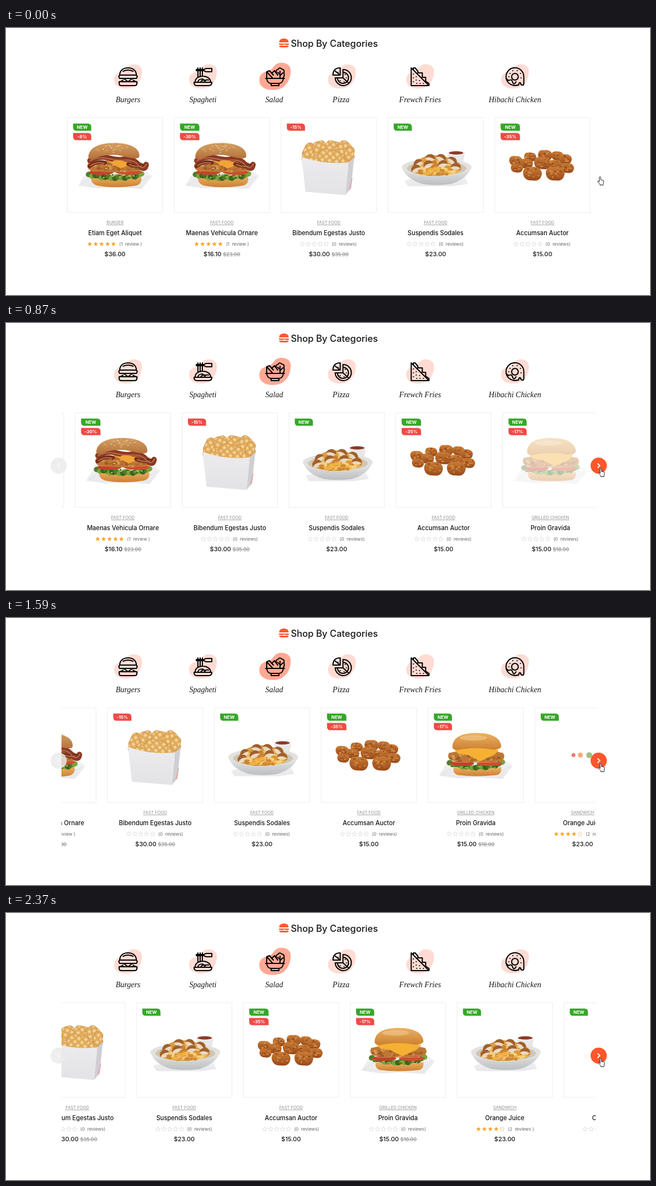
Write an HTML page that moves like this. It is 1161 px wide and 482 px high and loops after 2.4 s.

```html
<!DOCTYPE html>
<html lang="en">
<head>
<meta charset="utf-8">
<title>Shop By Categories</title>
<style>
html, body { margin: 0; width: 100%; height: 100%; overflow: hidden; background: #fff; }
svg { display: block; width: 100vw; height: 100vh; }
text { font-family: Inter, sans-serif; font-weight: 500; fill: #161616; white-space: pre; }
.mid { text-anchor: middle; }
.heading { font-size: 16.6px; }
.label { font: italic 14px "Liberation Serif", serif; }
.category { font-size: 7.6px; font-weight: 400; fill: #8c8c8c; text-decoration: underline; }
.title { font-size: 11.1px; }
.reviews { font-size: 8.1px; font-weight: 400; fill: #666; }
.price { font-size: 11px; }
.old { font-size: 9px; fill: #8c8c8c; text-decoration: line-through; }
.badge { font-size: 8px; font-weight: 700; fill: #fff; }
.icon { fill: none; stroke: #000; stroke-width: 2.1; stroke-linejoin: round; stroke-linecap: round; }
</style>
</head>
<body>
<svg id="stage" viewBox="0 0 1161 482"></svg>
<script>
const PITCH = 192.65, FIRST_LEFT = 110.5, CARD_WIDTH = 172, LOOP = 2400;

let seed = 7;
const rnd = () => (seed = (seed * 16807) % 2147483647) / 2147483647;
const range = n => [...Array(n).keys()];
const path = (d, fill, extra = '') => `<path d="${d}" fill="${fill}" ${extra}/>`;
const line = (d, color, width) =>
  path(d, 'none', `stroke="${color}" stroke-width="${width}" stroke-linecap="round"`);
const oval = (x, y, rx, ry, fill, extra = '') =>
  `<ellipse cx="${x}" cy="${y}" rx="${rx}" ry="${ry}" fill="${fill}" ${extra}/>`;
const group = (x, y, body, extra = '') => `<g transform="translate(${x} ${y})" ${extra}>${body}</g>`;
const turned = (x, y, angle, body) => `<g transform="translate(${x} ${y}) rotate(${angle})">${body}</g>`;
const text = (x, y, cls, body) => `<text x="${x}" y="${y}" class="${cls}">${body}</text>`;

// Small random flecks inside an ellipse.
const flecks = (n, x, y, rx, ry, colors, size) => range(n).map(i => {
  const a = rnd() * 6.283, r = Math.sqrt(rnd());
  return oval((x + Math.cos(a) * r * rx).toFixed(1), (y + Math.sin(a) * r * ry).toFixed(1),
    (size * (.6 + rnd() * .8)).toFixed(1), (size * (.4 + rnd() * .5)).toFixed(1), colors[i % colors.length]);
}).join('');

const gradient = (id, top, bottom) =>
  `<linearGradient id="${id}" x2="0" y2="1"><stop stop-color="${top}"/><stop offset="1" stop-color="${bottom}"/></linearGradient>`;

const defs = `<defs>
  ${gradient('bun', '#d6a063', '#b3713a')}${gradient('gold', '#eab264', '#cd7f31')}
  ${gradient('box', '#ececee', '#e3e3e6')}${gradient('paper', '#f4f4f5', '#e8e8eb')}
  ${gradient('plate', '#e9e9e8', '#bcbec0')}${gradient('nugget', '#ca7c35', '#97491a')}
  <pattern id="waffle" width="9" height="9" patternUnits="userSpaceOnUse" patternTransform="rotate(40)">
    <rect width="9" height="9" fill="#e6b264"/><rect x="2.5" y="2.5" width="4.6" height="4.6" rx="1" fill="#f3d5a0"/>
    <path d="M0 0H9M0 0V9" stroke="#d39a4c" stroke-width="1.4"/>
  </pattern>
  <clipPath id="window"><rect x="100" y="150" width="963" height="280"/></clipPath>
</defs>`;

// ---- Food pictures, drawn around (0, 0) ----
const napkin = path('M-66 37L-46 4H46L67 20L48 43L4 40L-30 42Z', 'url(#paper)')
  + line('M-60 36L-44 22M61 21L46 30', '#dcdce0', 1);
const lettuce = (y, rise) => range(17).map(i => {
  const sag = 1 - ((i - 8) / 8) ** 2;
  return oval(-47 + i * 5.9, (y + sag * rise + 1.5 * Math.sin(i * 1.9)).toFixed(1), 5.5, 5,
    ['#4d7f27', '#7ba23c', '#3d651f'][i % 3]);
}).join('') + flecks(24, 0, y + rise * .7, 46, 5, ['#9dbb54', '#32551a'], 2);
const patty = y => path(`M-48 ${y - 8}Q0 ${y - 18} 49 ${y - 8}Q55 ${y} 47 ${y + 6}Q0 ${y + 12} -44 ${y + 6}Q-53 ${y} -48 ${y - 8}Z`, '#bd7835')
  + flecks(55, 0, y, 46, 8, ['#9d5b27', '#d79c58', '#ad662a'], 2.6);
const tomatoes = y => oval(-25, y, 22, 4.5, '#c6402a') + oval(25, y, 23, 4.5, '#d04c30') + line(`M-40 ${y - 2}H-12M6 ${y - 2}H40`, '#e2805f', 1);

const foods = {
  bacon: napkin
    + path('M-43 20H47Q50 34 38 37Q0 43 -32 37Q-45 33 -43 20Z', 'url(#gold)')
    + lettuce(17, 6) + tomatoes(13) + patty(4)
    + path('M-16 -8L24 -9L30 -1L10 6Z', '#f2a437')
    + line('M-45 -8Q-30 -18 -12 -13T18 -11T42 -1T56 -1', '#8a3a24', 10)
    + line('M-46 2Q-32 -9 -18 -4M24 -2Q36 3 50 1', '#74301d', 7)
    + line('M-45 -8Q-30 -16 -14 -12T18 -9T42 0T57 -2M-44 1Q-32 -7 -20 -3M26 -1Q37 4 48 2', '#bb6c4b', 2)
    + line('M-2 -6Q6 -8 16 -5', '#f2a437', 4)
    + path('M-48 -14C-48 -28 -34 -40 -2 -40C29 -40 45 -30 44 -16C43 -9 28 -13 10 -17C-10 -21 -28 -16 -37 -12Q-46 -9 -48 -14Z', 'url(#bun)')
    + flecks(34, -3, -30, 34, 8, ['#e2bd88', '#c48a4c', '#dcae74'], 1.7),

  chicken: napkin
    + path('M-40 22H46Q47 34 38 36Q0 40 -32 36Q-42 33 -40 22Z', 'url(#gold)')
    + lettuce(14, 8) + tomatoes(15) + patty(4)
    + path('M-38 -9Q0 -19 42 -9L34 -1L8 11L-14 0L-32 -3Z', '#f6b034')
    + path('M-42 -14C-42 -31 -28 -40 2 -40C32 -40 46 -29 46 -15Q42 -9 30 -10Q0 -16 -32 -9Q-41 -9 -42 -14Z', 'url(#gold)')
    + oval(-4, -31, 24, 5, '#f6d195', 'opacity=".5"'),

  fries: [[-27, -14, 21, 13, -30], [28, -14, 17, 13, 25], [-37, -26, 8, 15, 25], [-16, -30, 12, 13, -15], [8, -31, 14, 12, 12],
      [27, -30, 12, 13, 40], [37, -21, 8, 13, 15], [2, -15, 20, 12, 12]].map(([x, y, rx, ry, turn]) =>
      turned(x, y, turn, `<rect x="${-rx}" y="${-ry}" width="${2 * rx}" height="${2 * ry}" rx="8" fill="url(#waffle)" stroke="#cf9448"/>`)).join('')
    + path('M36 -5L46 -15L40 42L30 54Z', '#cfcfd3') + path('M41 25L43 23L40 42L36 46Z', '#e2a9ad')
    + path('M-49 -15Q-8 0 36 -5L30 54L-42 48Z', 'url(#box)'),

  bowl: path('M-56 28L-20 18L50 16L58 34L30 38H-50Z', 'url(#paper)')
    + path('M21 -22L25 -3H49L53 -22Z', '#e8e8e9') + oval(37, -22, 16, 4.5, '#f1f1f1') + oval(37, -22, 13, 3, '#8a3a28')
    + path('M-61 3Q-54 25 -24 34Q2 38 28 34Q57 25 65 3Z', 'url(#plate)')
    + oval(2, 4, 63, 16, '#e3e2df') + oval(2, 6, 54, 13, '#cfc6b5')
    + path('M-45 6Q-34 -13 -10 -18Q20 -19 42 -4Q52 6 40 13Q0 25 -36 15Z', '#d99f48')
    + flecks(70, 2, 4, 43, 13, ['#efbd62', '#c98234', '#f3cd80', '#dd9733'], 4.2)
    + [[-32, -3], [-10, -13], [-14, -1], [10, -13], [13, -2], [30, -8], [36, 3], [-36, 7]].map(([x, y], i) =>
      turned(x, y, i * 47 % 80 - 40,
        path('M-9 2Q-8 -7 2 -7Q10 -5 9 2L5 4Z', '#a0602f') + path('M-9 2Q-3 -4 9 2Q4 7 -3 6Z', '#ead9bf'))).join('')
    + flecks(22, 2, 12, 38, 6, ['#f0b142', '#f4d07c', '#d08a35'], 4),

  nuggets: [[-22, -15, 11], [5, -18, 13], [27, -17, 11], [-48, -8, 12], [41, -11, 12], [-29, -3, 12], [0, -4, 15], [23, 0, 13],
      [45, 5, 12], [-46, 5, 11], [-18, 15, 17], [23, 15, 17]].map(([x, y, r]) =>
      path(`M${x - r} ${y}Q${x - r} ${y - r * .8} ${x - r * .2} ${y - r * .7}Q${x + r * .9} ${y - r * .8} ${x + r} ${y}Q${x + r * .9} ${y + r * .9} ${x} ${y + r * .75}Q${x - r * .9} ${y + r * .8} ${x - r} ${y}Z`, 'url(#nugget)')
      + flecks(16, x, y - 1, r * .8, r * .55, ['#d08a44', '#9a4f1f', '#bd6e2e'], 2)).join('')
};

// ---- Category icons ----
const dots = points => points.map(([x, y]) => `M${x} ${y}h.1`).join('');
const icons = [
  ['Burgers', 220, 220, 'M-15 -3C-15 -11 -9 -16 0 -16S15 -11 15 -3ZM-15 -3Q-18 0 -15 3H15Q18 0 15 -3M-15 3L-8 3L0 9L8 3M-16 9Q-12 9 -9 6M16 9Q12 9 9 6M-16 9H16V12Q16 16 12 16H-12Q-16 16 -16 12ZM-9 -10Q0 -14 9 -10'],
  ['Spagheti', 355, 355, 'M-12 -13H2Q4 -15 7 -15H16V-9H7Q4 -9 2 -11H-12M-9 -16V1M-5 -16V0M-1 -16V-1M-14 10C-14 2 -7 -1 0 -1S14 3 14 10M-9 10Q-9 4 0 4M-4 10Q-2 5 4 6M2 10Q6 4 10 6M-16 10H16Q16 16 11 16H-11Q-16 16 -16 10Z'],
  ['Salad', 485, 483.5, 'M-17 3H17M-15 3Q-14 12 -7 12H7Q14 12 15 3M-7 12V16H7V12M-15 3V-9L-4 3M-15 -9L-10 -11L-3 -3M-6 -6L-1 -11L5 -3M9 3V-10M9 -2L14 -7M9 -4L5 -8M3 -6Q0 -12 5 -13Q8 -18 12 -14Q18 -13 16 -7Q18 -2 14 3'],
  ['Pizza', 605.5, 604, 'M2 -13A14.5 14.5 0 1 1 -12 2H2ZM2 -8A10 10 0 1 1 -8 2M2 2L12 11M-3 -3H-16Q-16 -16 -3 -16ZM-3 -3L-13 -11' + dots([[-7, -8], [-3, 7], [8, 2], [6, -4], [4, 9]])],
  ['Frewch Fries', 746.5, 746.5, 'M-16 16V-16L16 16ZM-12 -12V-16H-9L-4 -10V-7H4V1H10V8L16 12V16' + dots([[-12, -5], [-12, 2], [-12, 9], [-7, 0], [-7, 6], [-6, 12], [-1, 7], [0, 12], [6, 12]])],
  ['Hibachi Chicken', 917.5, 917.5, 'M5 15A16 16 0 1 1 16 0V12Q16 16 13 15T10 11Q7 10 7 13T5 15ZM6 0A6 6 0 1 1 -6 0A6 6 0 1 1 6 0M-16 3Q-12 8 -9 6T-4 10T2 9' + dots([[-9, -6], [-4, -11], [4, -11], [10, -6], [-11, 0], [11, 2]])]
];
const BLOB = 'M25 -9C26 -19 16 -24 6 -22C-2 -20 -3 -12 -10 -9C-18 -8 -26 -4 -25 7C-24 17 -14 22 0 21C16 20 25 6 25 -9Z';
const categories = icons.map(([name, x, labelX, d], i) => {
  const active = i === 2;
  return group(x, 88, path(BLOB, active ? '#ffa995' : '#ffdbd3', active ? 'transform="scale(1.13)"' : '')
    + `<path class="icon" d="${d}"/>`) + text(labelX, 133.5, 'label mid', name);
}).join('');

// ---- Product cards ----
const products = [
  { food: 'bacon', badges: ['NEW', '-8%'], category: 'BURGER', title: 'Etiam Eget Aliquet', stars: 5, reviews: '(1  review )', price: '$36.00' },
  { food: 'bacon', badges: ['NEW', '-30%'], category: 'FAST FOOD', title: 'Maenas Vehicula Ornare', stars: 5, reviews: '(1  review )', price: '$16.10', old: '$23.00' },
  { food: 'fries', badges: ['-15%'], category: 'FAST FOOD', title: 'Bibendum Egestas Justo', price: '$30.00', old: '$35.00' },
  { food: 'bowl', badges: ['NEW'], category: 'FAST FOOD', title: 'Suspendis Sodales', price: '$23.00' },
  { food: 'nuggets', badges: ['NEW', '-35%'], category: 'FAST FOOD', title: 'Accumsan Auctor', price: '$15.00' },
  { food: 'chicken', badges: ['NEW', '-17%'], category: 'GRILLED CHICKEN', title: 'Proin Gravida', price: '$15.00', old: '$18.00', loadsAt: 720 },
  { food: 'bowl', badges: ['NEW'], category: 'SANDWICH', title: 'Orange Juice', stars: 4, reviews: '(2  reviews )', price: '$23.00', loadsAt: 1845 },
  { food: 'bowl', badges: ['NEW'], category: 'BURGER', title: 'Orange Juice', price: '$23.00', loadsAt: Infinity }
];

const starPoints = range(10).map(i => {
  const r = i % 2 ? 2 : 4.5, a = i * Math.PI / 5;
  return `${(r * Math.sin(a)).toFixed(2)},${(-r * Math.cos(a)).toFixed(2)}`;
}).join(' ');
const star = (x, filled, rated) => group(x, 390, `<polygon points="${starPoints}" ` +
  (filled ? 'fill="#f7a52b"/>' : `fill="#fff" stroke="${rated ? '#f0b860' : '#cfcfcf'}" stroke-width=".6"/>`));

function badgeStack(labels) {
  const width = labels.includes('-30%') || labels.includes('-35%') ? 35 : 32.7;
  return labels.map((label, i) => group(10.5, 172.4 + i * 17,
    path(`M0 0H${width - 6}Q${width} 0 ${width} 6V13H6Q0 13 0 7Z`, label === 'NEW' ? '#35a727' : '#ef4a45')
    + text(width / 2, 9.4, 'badge mid', label))).join('');
}

function card(p, i) {
  const mid = CARD_WIDTH / 2, { stars = 0, reviews = '(0  reviews)' } = p;
  const ratingX = mid - (stars === 5 ? 50 : 52);
  return group(FIRST_LEFT + i * PITCH, 0,
    `<rect y="162" width="${CARD_WIDTH}" height="171" fill="#fff" stroke="#ededed"/>`
    + group(mid, 247.5, foods[p.food], `id="food${i}"`)
    + group(mid, 247.5, [[-16.5, '#f1776b'], [-4, '#f9ad72'], [12, '#a5bd87'], [25, '#86a9c4']]
      .map(([x, color]) => `<circle cx="${x}" fill="${color}"/>`).join(''), `id="loader${i}"`)
    + badgeStack(p.badges)
    + text(mid, 354.2, 'category mid', p.category)
    + text(mid, 374.3, 'title mid', p.title)
    + range(5).map(n => star(ratingX + 4.5 + n * 10.7, n < stars, stars)).join('')
    + text(ratingX + 57.5, 392.8, 'reviews', reviews)
    + text(mid, 411.5, 'price mid', p.price + (p.old ? ` <tspan class="old">${p.old}</tspan>` : '')));
}

const roundButton = (id, x, fill, arrow, arrowColor) => group(x, 257.5,
  `<circle r="14.6" fill="${fill}"/>` + path(arrow, 'none', `stroke="${arrowColor}" stroke-width="1.8"`), `id="${id}"`);

document.getElementById('stage').innerHTML = defs
  + group(501, 27, path('M-8.5 -1C-8.5 -6 -5 -8 0 -8S8.5 -6 8.5 -1ZM-9 1H9V3L5 4L1 2.5L-3 4L-9 3ZM-8.5 5H8.5Q8.5 8 5 8H-5Q-8.5 8 -8.5 5Z', '#fb5a30'))
  + text(513.5, 34, 'heading', 'Shop By Categories')
  + categories
  + `<g clip-path="url(#window)"><g id="track">${products.map(card).join('')}</g></g>`
  + roundButton('prev', 95, 'rgba(234,234,234,.82)', 'M2 -4L-2 0L2 4', '#f8f8f8')
  + roundButton('next', 1068.5, '#ff562c', 'M-2 -4L2 0L-2 4', '#fff')
  + `<path id="hand" d="M3.6 9.5V1.8a1.3 1.3 0 0 1 2.6 0V6l4 .9q1.5.4 1.3 2.2l-.9 4.2V15.5H4.8V13.6L.8 9.6Q.4 7.8 2 8.2Z" fill="#fff" stroke="#222"/>`;

// ---- Motion ----
const slides = [[601, 404], [1421, 470], [2272, 440]];
const clamp = v => Math.min(1, Math.max(0, v));

// The standard CSS "ease" curve, cubic-bezier(.25, .1, .25, 1).
function ease(x) {
  let low = 0, high = 1;
  for (let i = 0; i < 24; i++) {
    const s = (low + high) / 2;
    if (.75 * s * (1 - s) + s ** 3 < x) low = s; else high = s;
  }
  return .3 * low * (1 - low) ** 2 + 3 * low * low * (1 - low) + low ** 3;
}

const byId = id => document.getElementById(id);
const parts = products.map((p, i) => ({ loadsAt: p.loadsAt ?? -Infinity, food: byId('food' + i), loader: byId('loader' + i) }));
const [track, prev, next, hand] = ['track', 'prev', 'next', 'hand'].map(byId);

function draw(now) {
  const t = now % LOOP;
  const offset = slides.reduce((sum, [start, duration]) => sum + ease(clamp((t - start) / duration)), 0) * PITCH;
  track.setAttribute('transform', `translate(${-offset.toFixed(2)} 0)`);

  for (const { loadsAt, food, loader } of parts) {
    food.setAttribute('opacity', clamp((t - loadsAt) / 400));
    loader.setAttribute('visibility', t < loadsAt ? 'visible' : 'hidden');
    [...loader.children].forEach((dot, n) =>
      dot.setAttribute('r', 4.4 + .9 * Math.sin((t - 1590) / 130 - 1.5 + n * 1.6)));
  }

  const enter = clamp((t - 15) / 270);
  prev.setAttribute('opacity', enter);
  next.setAttribute('opacity', enter);
  hand.setAttribute('transform', `translate(${1066 + 1.5 * ease(enter)} ${268 - 6 * ease(enter)})`);
}

const began = performance.now();
function tick() {
  draw(performance.now() - began);
  requestAnimationFrame(tick);
}
tick();
</script>
</body>
</html>
```
